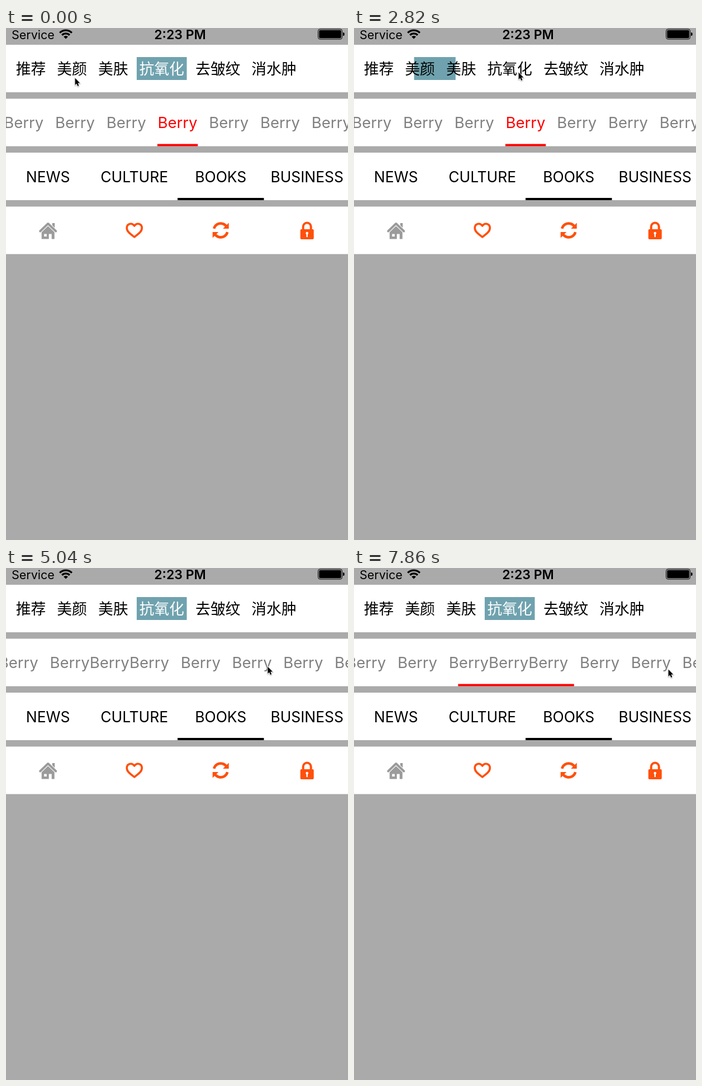
Animation of 612x916 px, one loop 8000 ms. Source, as an HTML page with a canvas:

```html
<!DOCTYPE html>
<html lang="zh-CN">
<head>
<meta charset="utf-8">
<title>Tab bars</title>
<style>
  html, body { margin: 0; width: 612px; height: 916px; overflow: hidden; background: #aaa; }
  canvas { display: block; }
</style>
</head>
<body>
<canvas id="stage" width="612" height="916"></canvas>
<script>
const ctx = document.getElementById('stage').getContext('2d');
const LOOP = 8000, STEP = 148.2;
const ORANGE = '#ff500b', TEAL = '#6fa2ae', GREY = '#808080';
const SANS = 'Inter, Roboto, "Liberation Sans", sans-serif';
const HAN = '"Noto Sans CJK SC", "Noto Sans CJK", sans-serif';

const lerp = (a, b, p) => a + (b - a) * p;
const ease = (t, start, length) => {
  const u = Math.min(1, Math.max(0, (t - start) / length));
  return u * u * (3 - 2 * u);
};

// Linear track through [time, ...values] keys.
function track(keys, t) {
  let i = 0;
  while (i < keys.length - 2 && t >= keys[i + 1][0]) i++;
  const a = keys[i], b = keys[i + 1];
  const p = Math.min(1, Math.max(0, (t - a[0]) / (b[0] - a[0])));
  return a.slice(1).map((v, n) => lerp(v, b[n + 1], p));
}

// Lay labels out left to right: each gets x and w.
function layout(widths, x, gap) {
  return widths.map(w => {
    const item = { x, w };
    x += w + gap;
    return item;
  });
}

// Marker box and selected index after a list of taps [time, index].
function marker(items, first, taps, pad, t) {
  const edge = i => ({ x: items[i].x - pad, w: items[i].w + 2 * pad });
  let box = edge(first), selected = first;
  for (const [start, index] of taps) {
    const p = ease(t, start, 500), to = edge(index);
    box = { x: lerp(box.x, to.x, p), w: lerp(box.w, to.w, p) };
    if (p > 0) selected = p < 1 ? -1 : index;
  }
  return { ...box, selected };
}

const HAN_LABELS = ['推荐', '美颜', '美肤', '抗氧化', '去皱纹', '消水肿'];
const hanItems = layout(HAN_LABELS.map(s => s.length * 26.8), 17.7, 20);
const HAN_TAPS = [[1044, 0], [2590, 3]];

const WORD = 'Berry', LONG = 2, COUNT = 14;
const wordItems = layout(Array.from({ length: COUNT }, (_, i) => i === LONG ? 214 : 71.4), 18, 20.35);
const WORD_TAPS = [[6360, 2], [7785, 4]];

const CURSOR = [
  [0, 123, 89], [740, 37, 77], [1780, 37, 77], [2120, 150, 90], [2520, 294, 79],
  [2830, 294, 79], [3260, 370, 87], [3420, 370, 87], [4000, 200, 198], [4298, 138, 189],
  [4594, 107, 176], [4742, 150, 176], [5039, 468, 176], [5778, 195, 172],
  [6220, 257, 172], [6390, 257, 172], [7700, 562, 181], [8000, 562, 181]
];
const DRAG = [
  [4594, 531.5], [4742, 488], [4890, 299], [5039, 123], [5187, 8], [5300, -24], [5650, 0]
];

function rect(x, y, w, h, color) {
  ctx.fillStyle = color;
  ctx.fillRect(x, y, w, h);
}

function text(s, x, y, font, color, align = 'center') {
  ctx.font = font;
  ctx.fillStyle = color;
  ctx.textAlign = align;
  ctx.fillText(s, x, y);
}

function poly(points, color) {
  ctx.beginPath();
  points.forEach(([x, y]) => ctx.lineTo(x, y));
  ctx.closePath();
  ctx.fillStyle = color;
  ctx.fill();
}

function rounded(x, y, w, h, r, color) {
  ctx.beginPath();
  ctx.roundRect(x, y, w, h, r);
  ctx.fillStyle = color;
  ctx.fill();
}

function arc(x, y, r, from, to, width, color) {
  ctx.beginPath();
  ctx.arc(x, y, r, from * Math.PI, to * Math.PI);
  ctx.lineWidth = width;
  ctx.strokeStyle = color;
  ctx.stroke();
}

function at(x, y, draw) {
  ctx.save();
  ctx.translate(x, y);
  draw();
  ctx.restore();
}

function statusBar() {
  text('Service', 10, 20, `21.5px ${SANS}`, '#000', 'left');
  at(107, 19.5, () => {
    arc(0, 0, 15.3, 1.25, 1.75, 3.3, '#000');
    arc(0, 0, 9.6, 1.25, 1.75, 3.3, '#000');
    arc(0, 0, 2.8, 1.25, 1.75, 5.6, '#000');
  });
  text('2:23 PM', 311.5, 20, `600 23px ${SANS}`, '#000');
  ctx.beginPath();
  ctx.roundRect(558.5, 2, 43, 18, 3.5);
  ctx.lineWidth = 1;
  ctx.strokeStyle = '#000';
  ctx.stroke();
  rounded(560.2, 3.7, 39.6, 14.6, 2, '#000');
  rounded(603, 8, 2.6, 6, [0, 2, 2, 0], '#000');
}

function hanRow(t) {
  const m = marker(hanItems, 3, HAN_TAPS, 4.6, t);
  rect(m.x, 52, m.w, 41, TEAL);
  HAN_LABELS.forEach((s, i) =>
    text(s, hanItems[i].x, 82.5, `26.8px ${HAN}`, i === m.selected ? '#fff' : '#000', 'left'));
}

function wordRow(t) {
  let offset = track(DRAG, t)[0];
  offset = lerp(offset, 2.7, ease(t, 6360, 330));
  offset = lerp(offset, 257.5, ease(t, 7785, 330));
  const m = marker(wordItems, 7, WORD_TAPS, 0.5, t);
  at(-offset, 0, () => {
    wordItems.forEach(({ x, w }, i) =>
      text(i === LONG ? WORD.repeat(3) : WORD, x + w / 2, 179, `27.5px ${SANS}`,
        i === m.selected ? '#f00' : GREY));
    rect(m.x, 207.5, m.w, 4, '#f00');
  });
}

function newsRow() {
  ['NEWS', 'CULTURE', 'BOOKS', 'BUSINESS'].forEach((s, i) =>
    text(s, 75.2 + 154.5 * i, 275.5, `26.4px ${SANS}`, '#000'));
  rect(307, 304, 154.5, 4, '#000');
}

function home() {
  const color = '#9b9b9b';
  rect(7.5, -13, 4.5, 9, color);
  poly([[0, -8], [11.5, 3], [11.5, 15.5], [-11.5, 15.5], [-11.5, 3]], color);
  ctx.beginPath();
  ctx.moveTo(-14, 1.5);
  ctx.lineTo(0, -12);
  ctx.lineTo(14, 1.5);
  ctx.lineWidth = 6;
  ctx.strokeStyle = '#fff';
  ctx.stroke();
  ctx.lineWidth = 4;
  ctx.lineCap = ctx.lineJoin = 'round';
  ctx.strokeStyle = color;
  ctx.stroke();
  rect(-7, 6.5, 4.6, 4.6, '#fff');
  rect(1.5, 6.5, 5, 9.5, '#fff');
}

function heart() {
  ctx.beginPath();
  ctx.moveTo(0, -8);
  ctx.bezierCurveTo(-4, -14, -13.5, -12.5, -13.5, -4);
  ctx.bezierCurveTo(-13.5, 2, -8, 6, 0, 12);
  ctx.bezierCurveTo(8, 6, 13.5, 2, 13.5, -4);
  ctx.bezierCurveTo(13.5, -12.5, 4, -14, 0, -8);
  ctx.closePath();
  ctx.lineWidth = 3.6;
  ctx.lineJoin = 'round';
  ctx.strokeStyle = ORANGE;
  ctx.stroke();
}

function refresh() {
  for (let i = 0; i < 2; i++) {
    arc(0, 0, 12.4, 1.08, 1.8, 4.6, ORANGE);
    poly([[14.5, -13.5], [14.5, -3], [4, -3]], ORANGE);
    ctx.rotate(Math.PI);
  }
}

function lock() {
  ctx.beginPath();
  ctx.moveTo(-7, 0);
  ctx.lineTo(-7, -6.5);
  ctx.arc(0, -6.5, 7, Math.PI, 0);
  ctx.lineTo(7, 0);
  ctx.lineWidth = 4;
  ctx.strokeStyle = ORANGE;
  ctx.stroke();
  rounded(-12, -2, 24, 18, 2, ORANGE);
  rounded(-2.3, 2.8, 4.6, 4.6, 2.3, '#fff');
  rect(-1.2, 5, 2.4, 7, '#fff');
}

function pointer(t) {
  const [x, y] = track(CURSOR, t);
  at(x, y, () => {
    ctx.beginPath();
    [[0.6, 0.5], [0.6, 13], [3.4, 10.4], [5.3, 15], [7.4, 14.1], [5.5, 9.6], [9.4, 9.4]]
      .forEach(p => ctx.lineTo(...p));
    ctx.closePath();
    ctx.shadowColor = 'rgba(0,0,0,.35)';
    ctx.shadowBlur = 2;
    ctx.shadowOffsetY = 1;
    ctx.lineWidth = 1.6;
    ctx.strokeStyle = '#fff';
    ctx.stroke();
    ctx.shadowColor = 'transparent';
    ctx.fillStyle = '#000';
    ctx.fill();
  });
}

function draw(t) {
  rect(0, 0, 612, 916, '#aaa');
  for (let i = 0; i < 4; i++) rect(0, 30 + 96.5 * i, 612, 85, '#fff');
  statusBar();
  hanRow(t);
  wordRow(t);
  newsRow();
  [home, heart, refresh, lock].forEach((icon, i) => at(75.2 + 154.5 * i, 362, icon));
  pointer(t);
}

// The screen refreshes in discrete steps, like a low-rate recording.
function tick(now) {
  const k = Math.min(53, Math.floor((now % LOOP + 12) / 148.3));
  draw(k * STEP);
  requestAnimationFrame(tick);
}
requestAnimationFrame(tick);
</script>
</body>
</html>
```
